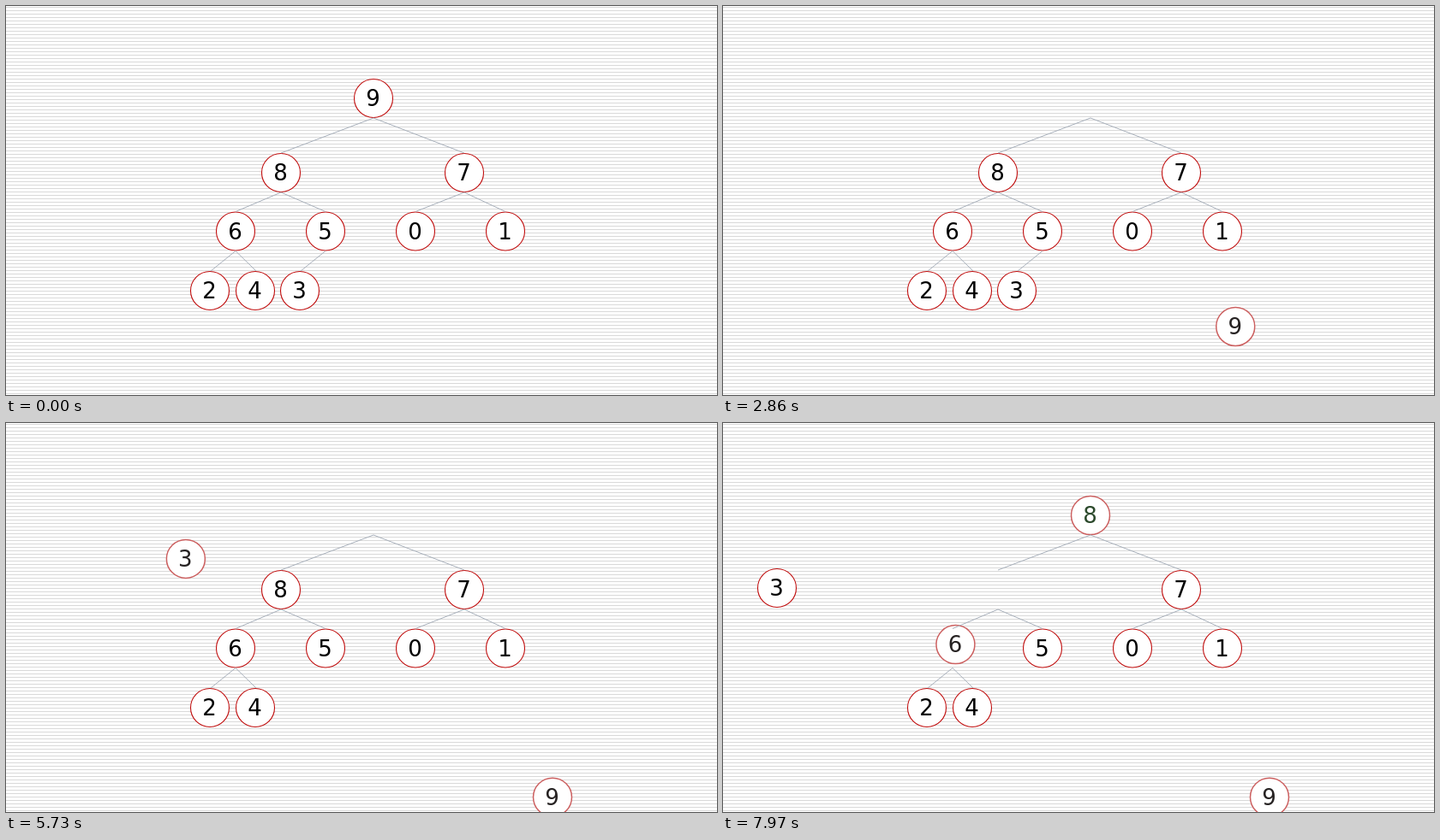
Write an HTML page with a canvas that moves like this. It is 830 by 455 pixels and loops after 8 s.

```html
<!DOCTYPE html>
<html lang="en">
<head>
<meta charset="utf-8">
<title>Heap sort</title>
<style>
html, body { margin: 0; width: 830px; height: 455px; overflow: hidden; background: #fff; }
canvas { display: block; }
</style>
</head>
<body>
<canvas id="stage" width="830" height="455"></canvas>
<script>
const ctx = document.getElementById('stage').getContext('2d');
const LOOP = 8000, MOVE = 1670, FIRST = 1630, STEP = 77.3;

const nodes = {
  9: [429, 108], 8: [321, 195], 7: [535, 195],
  6: [268, 263.5], 5: [373, 263.5], 0: [478, 263.5], 1: [583, 263.5],
  2: [238, 333], 4: [291, 333], 3: [343, 333]
};
const edges = [[9, 8], [9, 7], [8, 6], [8, 5], [7, 0], [7, 1], [6, 2], [6, 4], [5, 3]];

// "stop" holds a move shortly before its end
const moves = [
  { id: 9, start: 1732, to: [642, 444], stop: 3240 },
  { id: 3, start: 3172, to: nodes[9] },
  { id: 3, start: 4805, from: nodes[9], to: [63, 193], settles: true },
  { id: 8, start: 6217, to: nodes[9], tint: '#2c4a2c' },
  { id: 6, start: 7669, to: nodes[8] }
];

// Constant acceleration, then constant braking
const ease = p => p < 0.5 ? 2 * p * p : 1 - 2 * (1 - p) * (1 - p);

function drawPaper() {
  ctx.fillStyle = '#fff';
  ctx.fillRect(0, 0, 830, 455);
  ctx.fillStyle = '#d9d9d9';
  for (let y = 1; y < 455; y += 4) ctx.fillRect(0, y, 830, 1);
}

function drawEdge(a, b) {
  const [ax, ay] = nodes[a], [bx, by] = nodes[b];
  ctx.beginPath();
  ctx.moveTo(ax, ay + 23);
  ctx.lineTo(bx + (by > 300 ? 1 : 0), by - 23);
  ctx.strokeStyle = '#a8b0bb';
  ctx.lineWidth = 1;
  ctx.stroke();
}

function drawNode({ id, x, y, soft, ink }) {
  ctx.beginPath();
  ctx.arc(x, y, 22.5, 0, Math.PI * 2);
  ctx.fillStyle = '#fff';
  ctx.fill();
  ctx.strokeStyle = soft ? '#cc6060' : '#c00d0d';
  ctx.lineWidth = soft ? 1.5 : 1.1;
  ctx.stroke();
  ctx.fillStyle = ink;
  ctx.fillText(id, x - 0.5, y + 9);
}

function stateOf(id, t) {
  const [x, y] = nodes[id];
  const state = { id, x, y, soft: false, ink: '#000' };
  for (const m of moves) {
    if (m.id != id || t < m.start) continue;
    const p = Math.min(1, (Math.min(t, m.stop || t) - m.start) / MOVE);
    const from = m.from || nodes[id], k = ease(p);
    state.x = from[0] + (m.to[0] - from[0]) * k;
    state.y = from[1] + (m.to[1] - from[1]) * k;
    state.soft = !(m.settles && p > 0.97);
    state.ink = !state.soft ? '#000' : p === 1 && m.tint || '#262222';
  }
  return state;
}

function draw(now) {
  const clock = now % LOOP;
  const t = FIRST + Math.floor((clock - FIRST + 15) / STEP) * STEP;
  ctx.font = '26px Verdana, "DejaVu Sans", sans-serif';
  ctx.textAlign = 'center';
  drawPaper();
  const states = Object.keys(nodes).map(id => stateOf(id, t));
  states.sort((a, b) => a.soft - b.soft);
  states.forEach(drawNode);
  for (const [a, b] of edges) {
    if (b !== 3 || t < moves[1].start) drawEdge(a, b);
  }
}

const begin = performance.now();
function tick() {
  draw(performance.now() - begin);
  requestAnimationFrame(tick);
}
tick();
</script>
</body>
</html>
```
